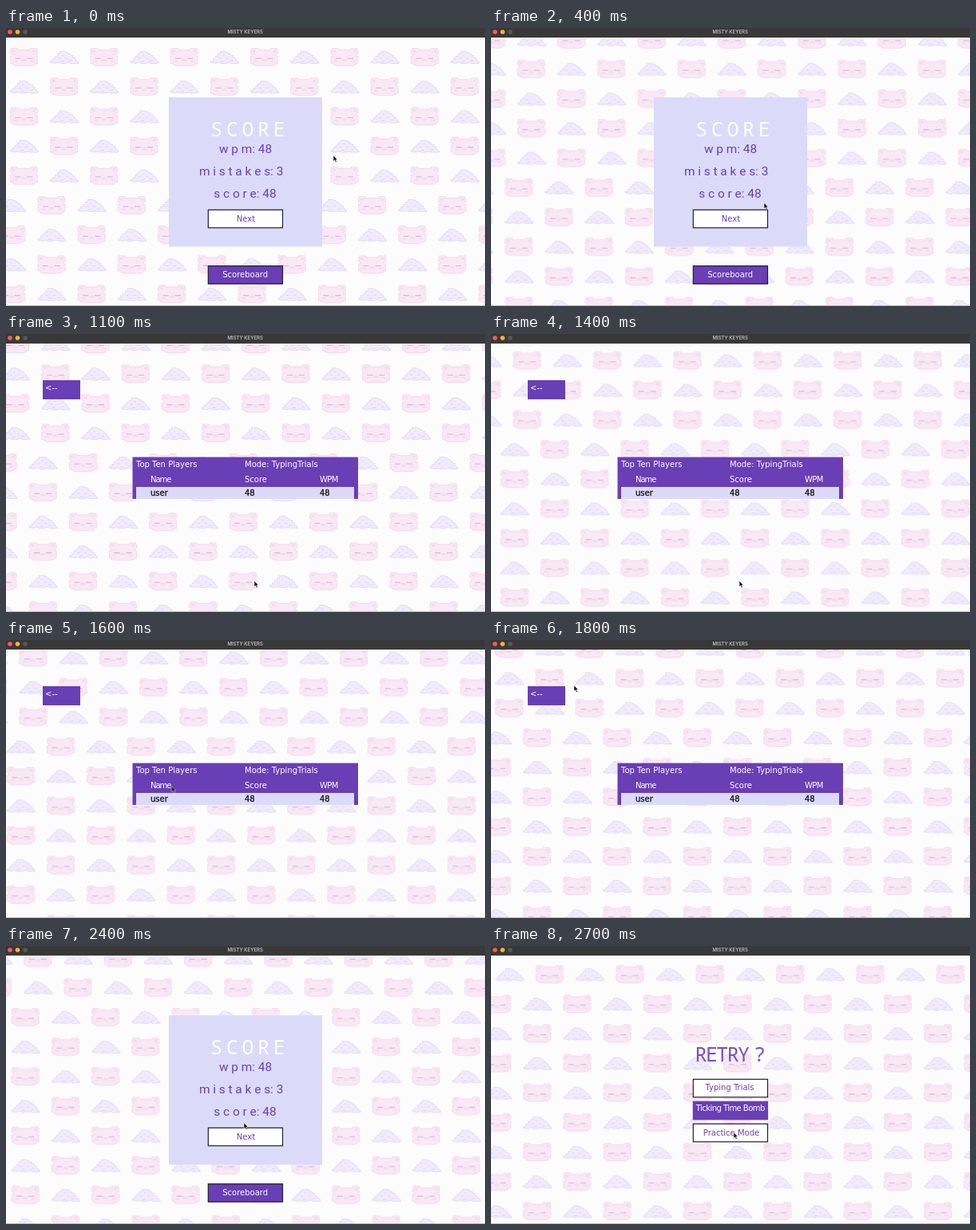
An HTML page for the animation above (2800 ms loop, 600 px wide and 349 px high).

```html
<!DOCTYPE html>
<html lang="en">
<head>
<meta charset="utf-8">
<title>Typing game</title>
<style>
  html, body { margin: 0; width: 100%; height: 100%; overflow: hidden; background: #fdfcfd; }
  svg { display: block; }
  text { font-family: "DejaVu Sans", sans-serif; font-size: 10px; }
  .mid { text-anchor: middle; }
  .big { font-family: "Noto Sans Mono", monospace; font-size: 25px; font-weight: 300; }
  .stat { font-family: Roboto, sans-serif; font-size: 15.4px; text-anchor: middle; }
  .purple { fill: #6a3eb4; }
  .white { fill: #fff; }
  .lilac { fill: #dbdbf9; }
  .edge { stroke: #221c2b; stroke-width: 1.2; }

  #drift, #cursor, .screen { animation: 2.8s -10ms infinite; }
  #drift { animation-name: drift; animation-timing-function: steps(28); }
  #cursor { animation-name: point; }
  .screen { animation-timing-function: step-end; }
  #score { animation-name: score; }
  #board { animation-name: board; }
  #retry { animation-name: retry; }

  @keyframes drift { to { transform: translate(-155.4px, -155.4px); } }
  @keyframes score {
    0% { visibility: visible; }
    35.71% { visibility: hidden; }
    75% { visibility: visible; }
    92.85%, 100% { visibility: hidden; }
  }
  @keyframes board {
    0% { visibility: hidden; }
    35.71% { visibility: visible; }
    75%, 100% { visibility: hidden; }
  }
  @keyframes retry {
    0% { visibility: hidden; }
    92.85%, 100% { visibility: visible; }
  }
  @keyframes point {
    0% { transform: translate(410px, 160px); animation-timing-function: steps(4); }
    14.28% { transform: translate(342px, 219.5px); animation-timing-function: steps(4); }
    28.57% { transform: translate(311px, 310px); }
    50% { transform: translate(311px, 310px); animation-timing-function: steps(4); }
    64.28% { transform: translate(104px, 57px); animation-timing-function: steps(2); }
    71.42% { transform: translate(72px, 68px); }
    75% { transform: translate(72px, 68px); animation-timing-function: steps(3); }
    85.71% { transform: translate(298px, 222px); animation-timing-function: steps(1); }
    89.28% { transform: translate(302px, 233px); animation-timing-function: steps(2); }
    96.42%, 100% { transform: translate(304px, 234px); }
  }
</style>
</head>
<body>
<svg width="600" height="349" viewBox="0 0 600 349">
  <defs>
    <g id="pig">
      <path fill="#f9e8f5" stroke="#f2d9ea" stroke-width=".9" d="M-16-11h8v2h16v-2h8v2h1v5h-2v3h2v9h-3v2h-3v1h-22v-1h-3v-2h-3v-9h2v-3h-2v-5h1z"/>
      <path fill="#f5dcec" d="M-15-9h4v3h-4zM11-9h4v3h-4zM-13 4h5v2h-5zM8 4h5v2h-5zM-3 2h6v3h-6z"/>
      <path fill="#d8bbda" d="M-11 1h7v1.3h-7zM4 1h7v1.3h-7z"/>
    </g>
    <g id="wing">
      <path fill="#f1ecfc" stroke="#e0d9f5" stroke-width=".9" d="M-17 7v-2h3v-3h3v-3h3v-3h3v-3h7v1h3v2h3v2h3v3h3v3h2v2h2v2h-10v-1h-5v1h-8v-1h-5v1z"/>
      <path fill="#dcd4f1" d="M-7 1h3v1h-3zM-2-3h2v1h-2zM2 1h3v1h-3zM7 4h4v1h-4zM-4 5h4v1h-4z"/>
    </g>
  </defs>
  <rect width="600" height="349" fill="#fdfcfd"/>
  <g id="drift"></g>
  <path d="M0 348.5h600" stroke="#b5b3b8" stroke-width=".8"/>

  <g id="score" class="screen">
    <rect class="lilac" x="204" y="87" width="192" height="187.5"/>
    <text class="big white" x="256" y="135.5" letter-spacing="4.7">SCORE</text>
    <g class="purple">
      <text class="stat" x="300" y="157">w p m: 48</text>
      <text class="stat" x="294.6" y="185">m i s t a k e s: 3</text>
      <text class="stat" x="299.5" y="213">s c o r e: 48</text>
    </g>
    <rect class="white edge" x="253.3" y="228.3" width="93.2" height="22.5"/>
    <text class="mid purple" x="300.5" y="243">Next</text>
    <rect class="purple edge" x="253.3" y="298.7" width="93.2" height="22.5"/>
    <text class="mid white" x="299.7" y="313.3">Scoreboard</text>
  </g>

  <g id="board" class="screen">
    <rect class="purple" x="46" y="58" width="47" height="24"/>
    <text class="white" x="49" y="71">&lt;--</text>
    <rect class="purple" x="158.5" y="154.5" width="282.5" height="52.5"/>
    <rect class="lilac" x="163" y="192" width="273" height="15"/>
    <g class="white">
      <text x="163" y="167">Top Ten Players</text>
      <text x="299" y="167">Mode: TypingTrials</text>
      <text x="181" y="186" letter-spacing="-1">Name</text>
      <text x="299" y="186">Score</text>
      <text x="393" y="186" letter-spacing="-.6">WPM</text>
    </g>
    <g fill="#15111c" stroke="#15111c" stroke-width=".3">
      <text x="181" y="203">user</text>
      <text x="299" y="203">48</text>
      <text x="393" y="203">48</text>
    </g>
  </g>

  <g id="retry" class="screen">
    <text class="big" fill="#7850c2" x="255.5" y="145" letter-spacing="-1.6" word-spacing="-7">RETRY ?</text>
    <rect class="white edge" x="253.3" y="167.3" width="93.2" height="22.5"/>
    <text class="mid purple" x="299" y="181.2">Typing Trials</text>
    <rect class="purple" x="252.7" y="194.7" width="94.4" height="23.7"/>
    <text class="mid white" x="299.8" y="207.2" letter-spacing="-.55">Ticking Time Bomb</text>
    <rect class="white edge" x="253.3" y="223.3" width="93.2" height="22.5"/>
    <text class="mid purple" x="301" y="238">Practice Mode</text>
  </g>

  <rect width="600" height="12" fill="#393839"/>
  <circle cx="5" cy="5" r="2.8" fill="#fc5b54"/>
  <circle cx="14.5" cy="5" r="2.8" fill="#f9b32f"/>
  <circle cx="24" cy="5" r="2.8" fill="#5a595a"/>
  <text class="mid" x="299.7" y="7" fill="#bdbcbd" style="font: 600 6px Inter, sans-serif">MISTY KEYERS</text>

  <path id="cursor" d="M0 0v7.2l1.7-1.5 1.2 2.7 1.3-.6-1.2-2.6h2.2z" fill="#0b0b0b" stroke="#fff" stroke-width=".5"/>
</svg>
<script>
  const drift = document.getElementById("drift");
  const stepX = 50.2, stepY = 37.2;

  // Checkered rows; the tile seam above row 0 shifts the rows over it sideways.
  for (let row = -6; row <= 8; row++) {
    for (let col = -2; col <= 14; col++) {
      const use = document.createElementNS("http://www.w3.org/2000/svg", "use");
      use.setAttribute("href", (row + col) % 2 ? "#wing" : "#pig");
      use.setAttribute("x", (row < 0 ? 72.6 : 57) + col * stepX);
      use.setAttribute("y", 222.5 + row * stepY);
      drift.append(use);
    }
  }
</script>
</body>
</html>
```
